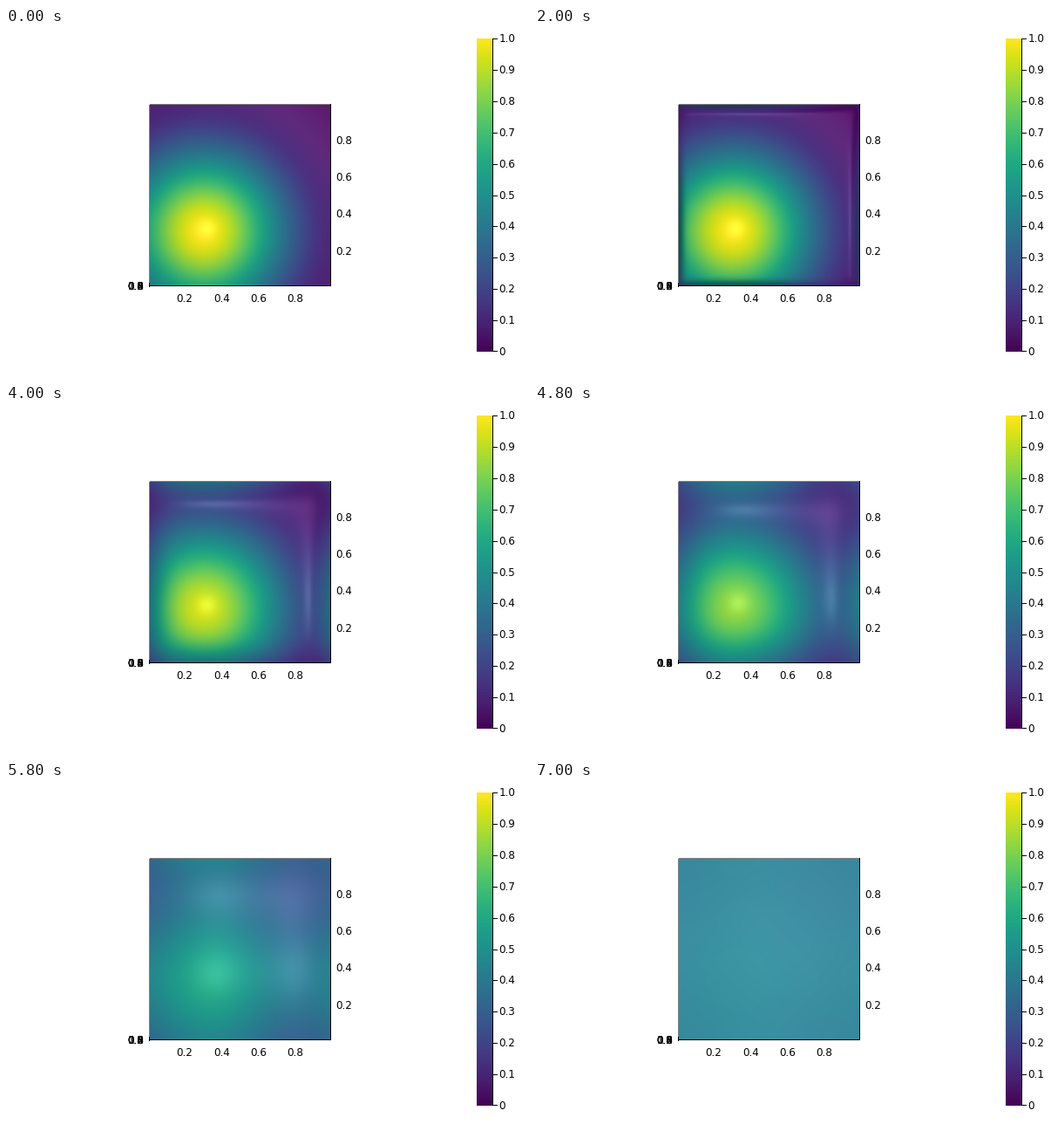
Animation, 600 px wide and 400 px high, one loop 9 s. Source, as a matplotlib script:

```python
import numpy as np
import matplotlib
import matplotlib.pyplot as plt
from matplotlib.animation import FuncAnimation

W, H, DPI = 600, 400, 100
STEP_MS, FRAMES, LAST = 200, 45, 35
N = 64
LEFT, TOP, SIZE = 165, 88, 207
Z_SCALE = 0.18
GLOSS_TILT = 0.03
FONT = 12 * 72 / DPI

viridis = matplotlib.colormaps["viridis"]
nodes = (np.arange(N) + 0.5) / N
pixels = np.linspace(nodes[0], nodes[-1], SIZE)
start = np.exp(-5 * (nodes - 0.3) ** 2)
spectrum = np.fft.fft(start)
decay = N**2 * (2 - 2 * np.cos(2 * np.pi * np.arange(N) / N))

# Diffusion time grows almost exponentially from step to step
KEY_STEPS = [1, 6, 10, 16, 24, 29, 35]
KEY_TIMES = [2e-5, 1.2e-4, 2.3e-4, 1.2e-3, 8.8e-3, 2.9e-2, 8e-2]


def profile(step):
    """One factor of the separable periodic heat solution, and its slope."""
    g = start
    if step > 0:
        t = np.exp(np.interp(step, KEY_STEPS, np.log(KEY_TIMES)))
        g = np.fft.ifft(spectrum * np.exp(-decay * t)).real
    slope = np.gradient(g, nodes)
    return np.interp(pixels, nodes, g), np.interp(pixels, nodes, slope)


def surface(step):
    """Colour the height field and light it from slightly up and right."""
    g, dg = profile(step)
    u = np.outer(g, g)
    normal = np.dstack([-Z_SCALE * np.outer(g, dg),
                        -Z_SCALE * np.outer(dg, g), np.ones_like(u)])
    normal /= np.linalg.norm(normal, axis=2, keepdims=True)

    def facing(tilt):
        light = np.array([tilt, tilt, 1])
        return np.clip(normal @ light / np.linalg.norm(light), 0, 1)[..., None]

    diffuse = 0.2 + 0.8 * facing(2 * GLOSS_TILT)
    gloss = 0.1 * facing(GLOSS_TILT) ** 300
    return np.clip(viridis(u)[..., :3] * diffuse + gloss, 0, 1)


fig = plt.figure(figsize=(W / DPI, H / DPI), dpi=DPI, facecolor="white")
ax = fig.add_axes([0, 0, 1, 1])
ax.axis("off")


def label(x, y, text, ha):
    ax.text(x - 0.5, y - 1, text, ha=ha, va="center_baseline", fontsize=FONT,
            family="DejaVu Sans", color="black")


def line(xs, ys, color="black"):
    ax.plot(xs, ys, color=color, lw=72 / DPI, solid_capstyle="butt",
            snap=False)


right, bottom = LEFT + SIZE, TOP + SIZE
image = ax.imshow(surface(0), extent=(LEFT, right, bottom, TOP),
                  origin="lower", interpolation="nearest", aspect="auto")
image.set_extent((LEFT, right, bottom, TOP))
ax.imshow(np.linspace(1, 0, 256)[:, None], cmap=viridis, aspect="auto",
          extent=(540, 558, 371, 12), interpolation="nearest")
ax.set_xlim(0, W)
ax.set_ylim(H, 0)

line([LEFT, right], [TOP - 0.5] * 2, "0.5")
line([LEFT - 0.5] * 2, [TOP, bottom], "0.5")
line([LEFT, right + 1], [bottom + 0.5] * 2)
line([right + 0.5] * 2, [TOP - 1, bottom + 1])
line([164.5, 164.5], [292, 297])
for v in (0.2, 0.4, 0.6, 0.8):
    label(163.3 + 211.3 * v, 310, f"{v:.1f}", "center")
    label(379, 297.9 - 211.6 * v, f"{v:.1f}", "left")
for v in np.linspace(0, 1, 6):
    label(159, 296, f"{v:.1f}", "right")

line([558.5, 558.5], [12, 371])
for k in range(11):
    y = 371 - 35.9 * k
    line([558, 564], [round(y) + 0.5 - (k == 0)] * 2)
    label(566, y, "0" if k == 0 else f"{k / 10:.1f}", "left")


def update(i):
    image.set_data(surface(min(i, LAST)))
    return [image]


anim = FuncAnimation(fig, update, frames=FRAMES, interval=STEP_MS,
                     repeat=True, repeat_delay=0, blit=False)
plt.show()
```
